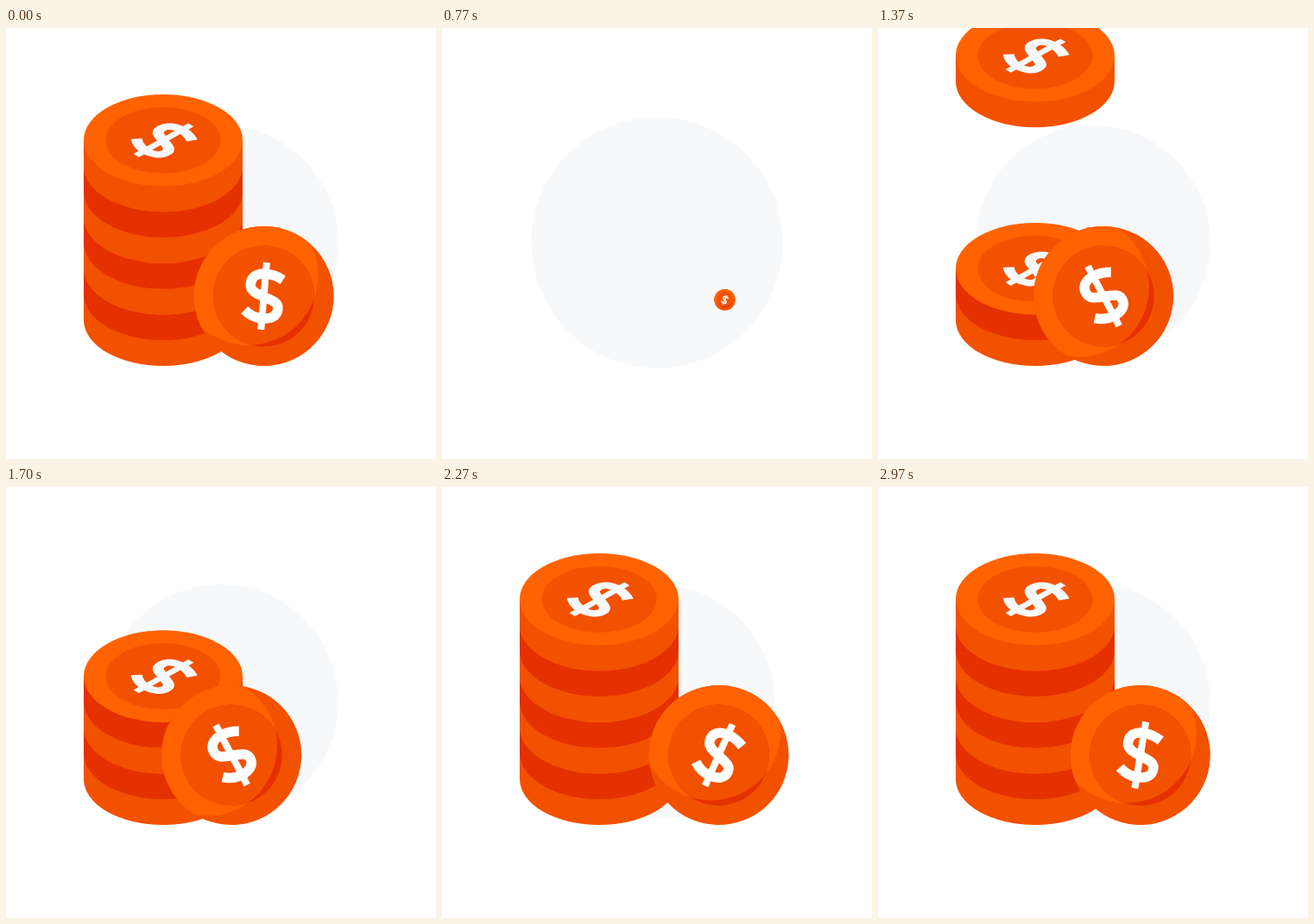
Write an HTML page with a canvas that moves like this. It is 498 by 500 pixels and loops after 3010 ms.

```html
<!DOCTYPE html>
<html lang="en">
<head>
<meta charset="utf-8">
<title>Coin stack</title>
<style>
  html, body { margin: 0; overflow: hidden; background: #fff; }
  canvas { display: block; }
</style>
</head>
<body>
<canvas id="stage" width="498" height="500"></canvas>
<script>
const ctx = document.getElementById('stage').getContext('2d');
const LOOP = 3010, STEP = 1000 / 30, STEPS = 90, FIRST_STEP = 17;
const LIGHT = '#ff6200', MID = '#f25100', DARK = '#e53000', PALE = '#f6f8fa';
const RADIUS = 81, INNER = 58.5;
const curl = new Path2D('M20.5-20.5C13-24.5 7-26 0-26C-10-26-16.5-21-16.5-13' +
  'C-16.5-4-8-2 1 1C11 4.5 17.5 6 17.5 13.5C17.5 22 10 26 0 26C-8 26-15 23-21 18');
const bar = new Path2D('M0-39V39');

// Cubic bezier (.6, 0, .4, 1)
function ease(x) {
  if (x <= 0) return 0;
  if (x >= 1) return 1;
  let lo = 0, hi = 1;
  for (let i = 0; i < 24; i++) {
    const s = (lo + hi) / 2, r = 1 - s;
    if (1.8 * s * r * r + 1.2 * s * s * r + s * s * s < x) lo = s; else hi = s;
  }
  return lo * lo * (3 - 2 * lo);
}

// Value at time t through [time, value] keys, eased between them
function keyed(t, keys) {
  let value = keys[0][1];
  for (let i = 1; i < keys.length; i++) {
    const [t0, v0] = keys[i - 1], [t1, v1] = keys[i];
    if (t >= t0) value = v0 + (v1 - v0) * ease((t - t0) / (t1 - t0));
  }
  return value;
}

function oval(x, y, rx, ry, color) {
  ctx.beginPath();
  ctx.ellipse(x, y, rx, ry, 0, 0, 2 * Math.PI);
  ctx.fillStyle = color;
  ctx.fill();
}

function clipDisc(x, y, r) {
  ctx.beginPath();
  ctx.arc(x, y, r, 0, 2 * Math.PI);
  ctx.clip();
}

function dollar(color) {
  ctx.strokeStyle = color;
  ctx.lineWidth = 11.5;
  ctx.stroke(curl);
  ctx.lineWidth = 8;
  ctx.stroke(bar);
}

function flatCoin(y, side) {
  ctx.save();
  ctx.translate(182, y);
  oval(0, 29.8, 92, 53.3, side);
  ctx.fillRect(-92, 0, 184, 29.8);
  oval(0, 0, 92, 53.3, LIGHT);
  oval(0, 0, 66.5, 38.5, MID);
  ctx.translate(0.5, 0);
  ctx.scale(1.136, 0.655);
  ctx.rotate(0.8);
  dollar(PALE);
  ctx.restore();
}

function rollingCoin(x, scale) {
  const angle = (x - 293) * 0.87 * Math.PI / 180, shade = 0.84;
  const dx = -30 * Math.cos(shade), dy = -30 * Math.sin(shade);
  ctx.save();
  ctx.translate(x, 311);
  ctx.scale(scale, scale);
  ctx.rotate(angle);
  oval(0, 0, RADIUS, RADIUS, MID);
  ctx.save();
  clipDisc(0, 0, RADIUS);
  oval(dx, dy, RADIUS, RADIUS, LIGHT);
  ctx.restore();
  oval(0, 0, INNER, INNER, DARK);
  ctx.save();
  clipDisc(0, 0, INNER);
  oval(dx, dy, RADIUS, RADIUS, MID);
  ctx.restore();
  dollar('#fff');
  ctx.restore();
}

function draw(t) {
  ctx.clearRect(0, 0, 498, 500);
  ctx.save();
  const pulse = keyed(t, [[0, 1], [367, 1.09], [655, 1]]);
  ctx.translate(249, 249);
  ctx.scale(pulse, pulse);
  ctx.translate(-249, -249);
  oval(249, 249, 136, 136, PALE);

  for (let i = 0; i < 7; i++) {
    const fall = Math.min(1, 1 + (t - 469 - 200 * i) / 127);
    if (fall > 0) flatCoin(309 - 29.8 * i - 450 * (1 - fall * fall), i % 2 ? DARK : MID);
  }

  if (t >= 225) {
    const x = keyed(t, [[0, 327], [1000, 259], [2000, 327], [3000, 259]]);
    rollingCoin(x, keyed(t, [[165, 0], [400, 1.2], [435, 1.2], [735, 1]]));
  }
  ctx.restore();
}

// The motion advances in 30 steps per second
const begin = performance.now();
function tick() {
  const elapsed = (performance.now() - begin) % LOOP;
  const step = Math.min(STEPS - 1, Math.floor((elapsed + 5) / STEP));
  draw(((step - FIRST_STEP + STEPS) % STEPS + 1) * STEP);
  requestAnimationFrame(tick);
}
tick();
</script>
</body>
</html>
```
